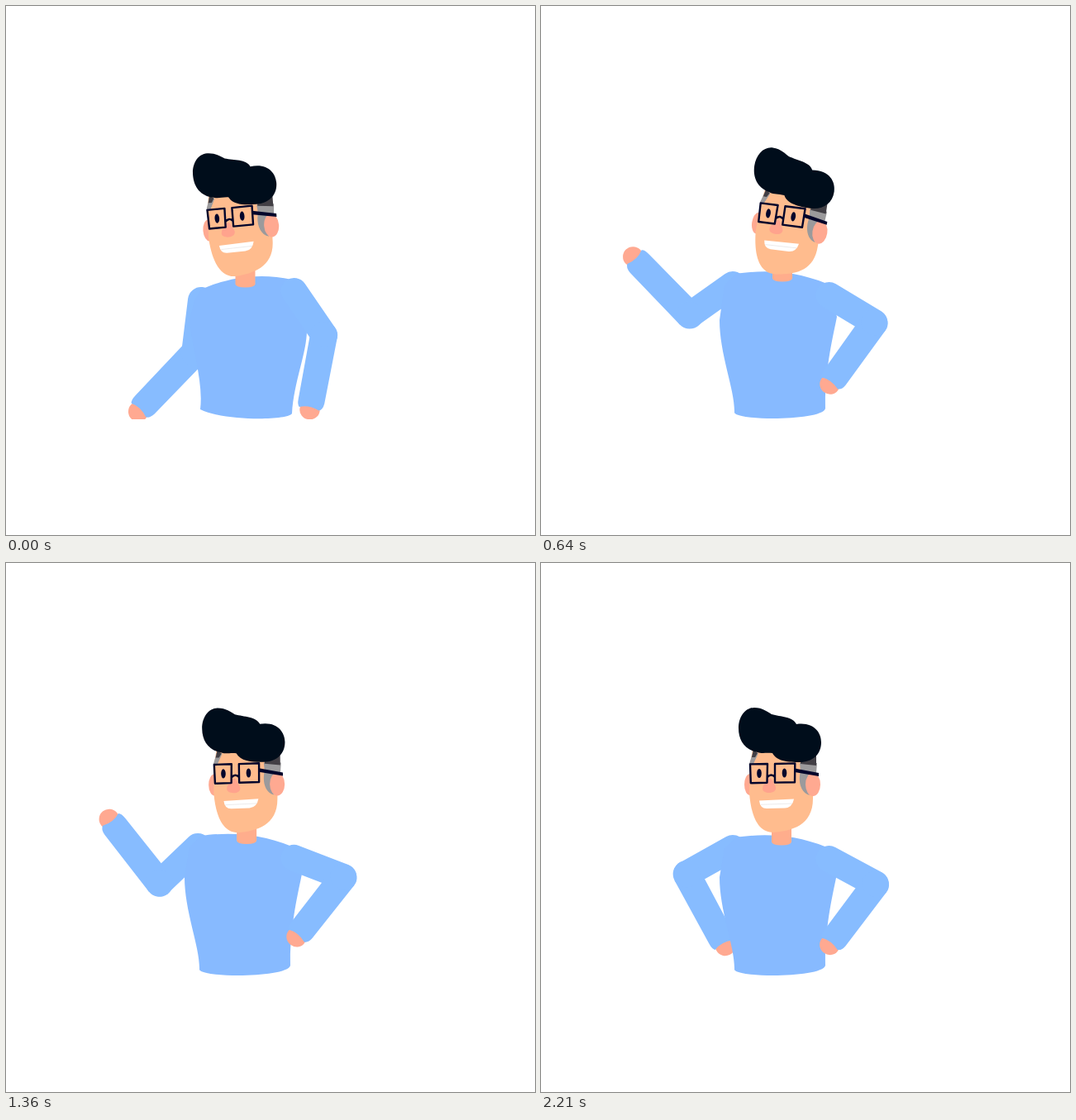
An HTML page for the animation above (3570 ms loop, 640x640 px).

```html
<!DOCTYPE html>
<html lang="en">
<head>
<meta charset="utf-8">
<title>Waving man</title>
<style>
  html, body { margin: 0; width: 100%; height: 100%; overflow: hidden; background: #fff; }
  svg { display: block; width: 100%; height: 100%; }
  .sleeve { fill: #87bcff; }
  .upper { fill: none; stroke: #87bcff; stroke-width: 32; stroke-linecap: round; }
  .blush { fill: #ffa991; }
  .frame { fill: none; stroke: #02052b; stroke-width: 2.4; stroke-linejoin: round; }
  .dark { fill: #02052b; }
</style>
</head>
<body>
<svg viewBox="0 0 640 640">
  <defs>
    <clipPath id="desk"><rect width="640" height="500"/></clipPath>
    <g id="forearm">
      <circle class="blush" cx="98.5" r="12.2"/>
      <path class="sleeve" d="M0-16.5L87-16Q95-15.5 97-11Q92 2 97 13Q95 16 87 16L0 16.5Z"/>
      <circle class="sleeve" r="16.5"/>
    </g>
  </defs>
  <g clip-path="url(#desk)">
    <g id="left"><path class="upper"/><use href="#forearm"/></g>
    <path id="torso" fill="#87baff"/>
    <g id="right"><path class="upper"/><use href="#forearm"/></g>
    <path id="neck" fill="#ffad8c"/>
    <g id="head">
      <ellipse class="blush" cx="253" cy="268" rx="7" ry="13"/>
      <path fill="#ffbc8e" d="M256 226L253 243 252 278C254 305 262 326 281 326C303 324 329 318 329 285L331 226Z"/>
      <path fill="#9b9a9c" d="M257 227L263 230 257 243 252 243ZM313 242L334 242 333 254 326 256Q317 268 325 281C313 278 311 262 314 252Z"/>
      <path fill="#423f45" d="M257 226L262 230 259 235 255 235ZM314 232L333 232 333 245 314 243Z"/>
      <ellipse class="blush" cx="329" cy="268" rx="9" ry="14"/>
      <path fill="#ffa38d" d="M274 263Q277 258 280 263L284 271C286 280 268 280 268 273Q268 267 274 266Z"/>
      <path fill="#fff" d="M264 287.5L306 285.5Q304 296 295 296.5L273 297Q265 297 264 287.5Z"/>
      <path fill="none" stroke="#e6e3e3" stroke-width=".7" d="M266 292.3L304 291"/>
      <ellipse class="dark" cx="264" cy="254.5" rx="2.8" ry="5.6"/>
      <ellipse class="dark" cx="294.5" cy="254" rx="2.8" ry="5.6"/>
      <path class="frame" d="M253 243.4L274 243 273.5 265.8 253.8 266.2ZM283 243L307.3 242.4 307 265.2 283 265.6ZM274 259Q278.5 254 283 259"/>
      <path class="dark" d="M307 248.5L336 254 336 258 307 253Z"/>
      <path fill="#000d1b" d="M258 175C268 175 274 180 279 183C290 186 305 186 309 195C330 192 339 205 339 217C339 232 328 241 313 241C300 241 285 240 280 230C272 229 268 231 262 229C246 226 239 214 239 200C239 186 247 175 258 175Z"/>
    </g>
  </g>
</svg>
<script>
const LOOP = 3570, RATE = 14, LAST = 31, UPPER = 64;

const get = id => document.getElementById(id);
const phase = (tick, from, to) => Math.min(1, Math.max(0, (tick - from) / (to - from)));
const ease = (...span) => { const k = phase(...span); return k * k * (3 - 2 * k); };
const arch = (...span) => Math.sin(Math.PI * phase(...span));

function poseArm(id, x, y, upper, fore, scale) {
  const angle = upper * Math.PI / 180;
  const ex = x + UPPER * Math.cos(angle), ey = y + UPPER * Math.sin(angle);
  const [sleeve, forearm] = get(id).children;
  sleeve.setAttribute('d', `M${x} ${y}L${ex} ${ey}`);
  forearm.setAttribute('transform', `translate(${ex} ${ey}) rotate(${fore}) scale(${scale} 1)`);
}

// dl and dr are how far the left and right shoulders sit below rest.
function poseBody(lean, dl, dr, neckX) {
  get('torso').setAttribute('d',
    `M236 ${332 + dl}C262 ${328 + (2 * dl + dr) / 3} 302 ${326 + (dl + 2 * dr) / 3} 346 ${344 + dr}` +
    `L${358 + 6 * lean} ${376 + 16 * lean}` +
    `C${354 + 10 * lean} ${397 + 23 * lean} ${343 + 5 * lean} ${440 + 15 * lean} ${344 + 2 * lean} ${487 + 6 * lean}` +
    `C340 502 ${238 + 24 * lean} 502 ${234 + lean} ${492 - 4 * lean}` +
    `C${235 + 4 * lean} ${465 - 10 * lean} ${216 + 10 * lean} ${422 - 2 * lean} ${216 + 6 * lean} 380` +
    `L${222 + 6 * lean} ${345 + dl}Z`);
  get('neck').setAttribute('d',
    `M${neckX - 12} 305h24V${337.5 + (dl + dr) / 2}q-1 4-12 4t-12-4Z`);
}

function draw(tick) {
  // Stages of the gesture: raise the hand, sink a little, drop it to the hip, come to rest.
  const raise = ease(tick, 0, 5), sink = ease(tick, 9, 22);
  const drop = ease(tick, 22, 27), rest = ease(tick, 27, 31);

  const leftY = 356 - 19 * raise + 7 * sink + 6 * drop - 5 * rest;
  const rightY = 345 + 5 * raise + 8 * sink;
  poseBody(1 - raise, leftY - 345, rightY - 358, 289.5 + 2.5 * raise - sink);

  const tilt = -4.5 + 18.8 * ease(tick, 0, 6) - 15.1 * ease(tick, 6, 13) + .8 * rest;
  get('head').setAttribute('transform',
    `translate(${-3 * (1 - raise) - drop + rest} 0) rotate(${tilt} 294 328)`);

  poseArm('left', 236 - 4 * raise, leftY,
    97 + 47.6 * raise - 9.6 * sink + 19.7 * drop - 4 * rest - 40 * arch(tick, 22, 27),
    133.7 + 92.2 * ease(tick, 0, 4) + 6.8 * sink - 171 * phase(tick, 22, 27) - 6 * arch(tick, 9, 15), 1);
  poseArm('right', 348.5, rightY,
    55.6 - 24.6 * raise - 11.6 * sink + 9 * drop,
    100.7 + 25.1 * raise + 2.6 * sink - 1.4 * drop, .94);
}

const start = performance.now();
function play() {
  const time = (performance.now() - start) % LOOP;
  draw(Math.min(LAST, Math.floor(time * RATE / 1000 + .1)));
  requestAnimationFrame(play);
}
play();
</script>
</body>
</html>
```
